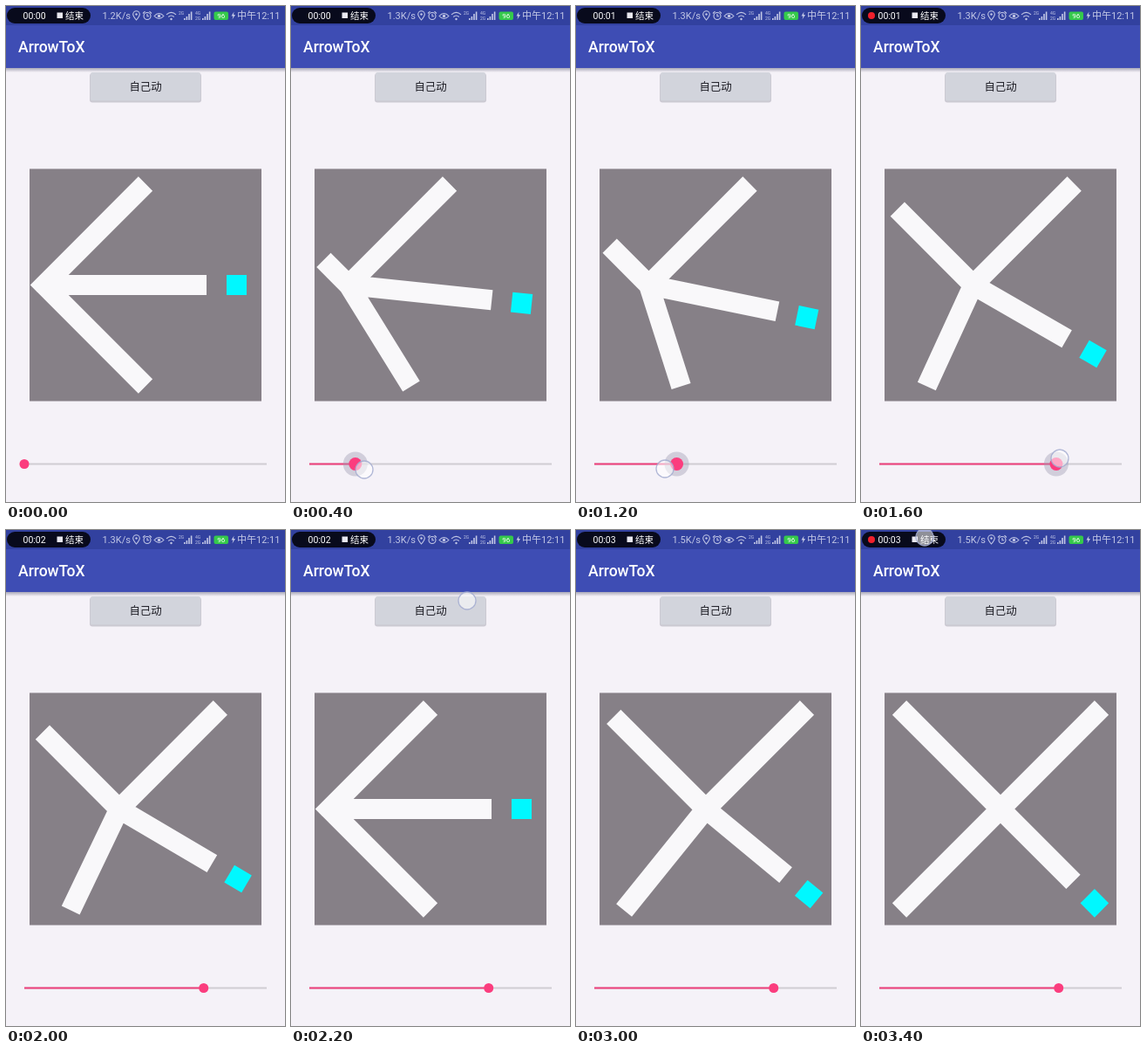
An HTML page that plays this animation: 320 by 568 pixels, repeating every 3600 ms.

```html
<!DOCTYPE html>
<html lang="zh">
<head>
<meta charset="utf-8">
<title>ArrowToX</title>
<style>
  html, body { margin: 0; width: 100%; height: 100%; overflow: hidden; background: #f5f2f8; }
  svg { display: block; width: 320px; height: 568px; }
  text { font-family: Roboto, "Noto Sans CJK SC", "Noto Sans CJK", sans-serif; }
</style>
</head>
<body>
<svg viewBox="0 0 320 568" xmlns="http://www.w3.org/2000/svg">
  <defs>
    <linearGradient id="shade" x2="0" y2="1">
      <stop offset="0" stop-color="#a9a8b8"/>
      <stop offset="1" stop-color="#f5f2f8"/>
    </linearGradient>
  </defs>
  <rect width="320" height="568" fill="#f5f2f8"/>

  <!-- app bar -->
  <rect y="71" width="320" height="5" fill="url(#shade)"/>
  <rect width="320" height="71" fill="#3e4db4"/>
  <rect width="320" height="22" fill="#32419f"/>
  <text x="14" y="53" font-size="17.5" font-weight="500" fill="#fff">ArrowToX</text>

  <!-- recorder pill -->
  <rect x="1" y="2" width="96" height="18" rx="9" fill="#080a1c"/>
  <circle id="rec" cx="12" cy="11" r="4" fill="#f0202c"/>
  <text id="clock" x="19.5" y="15" font-size="10.5" fill="#fff"></text>
  <rect x="58.5" y="7.5" width="6.5" height="6.5" fill="#e8e8f0"/>
  <text x="68" y="15" font-size="10.5" fill="#fff">结束</text>

  <!-- status icons -->
  <g fill="#c3c8e6">
    <text id="speed" x="110.5" y="15" font-size="11"></text>
    <text x="198" y="10" font-size="5">2G</text>
    <text x="217" y="10" font-size="5">4G</text>
    <text x="217" y="16" font-size="5">2G</text>
    <path id="bars" d="M204 16v-2h1.6v2zM206.6 16v-4h1.6v4zM209.2 16v-7h1.6v7zM211.8 16v-9.500h1.6v9.500z"/>
    <use href="#bars" x="21"/>
    <path d="M261.500 6.500l-3 5h2l-1 4 3.500-5.500h-2z"/>
    <text x="265" y="15" font-size="11">中午12:11</text>
    <circle cx="149.500" cy="9.500" r="1.2"/>
    <circle cx="175.500" cy="11.500" r="1.700"/>
    <circle cx="189.500" cy="15" r="1.2"/>
  </g>
  <g fill="none" stroke="#c3c8e6" stroke-width="1.1">
    <path d="M149.500 16Q145.700 11.500 145.700 9.500A3.800 3.800 0 0 1 153.300 9.500Q153.300 11.500 149.500 16Z"/>
    <circle cx="162" cy="11.500" r="4"/>
    <path d="M162 9v2.700h2M157 8.500l2.500-2.300M167 8.500l-2.500-2.300"/>
    <path d="M170 11.500Q175.500 5.500 181 11.500Q175.500 17.500 170 11.500Z"/>
    <path d="M184 9.800Q189.500 4.800 195 9.800M186.300 12.500Q189.500 9.500 192.700 12.500"/>
  </g>
  <rect x="238.500" y="6.500" width="16.500" height="9.500" rx="2" fill="#35c94b"/>
  <text x="246.800" y="14.200" font-size="8" text-anchor="middle" fill="#fff">96</text>

  <!-- button -->
  <rect x="96" y="77" width="128" height="33.500" rx="3" fill="#b9b8c2" opacity=".7"/>
  <rect id="button" x="97" y="76" width="126" height="32.500" rx="2"/>
  <text x="160" y="97.300" font-size="12.400" font-weight="500" text-anchor="middle" fill="#1d1d25">自己动</text>

  <!-- morphing arrow -->
  <rect x="27" y="186.500" width="266" height="266" fill="#868087"/>
  <path id="arms" fill="none" stroke="#f9f8fa" stroke-width="23"/>
  <path id="dot" fill="none" stroke="#00f8ff" stroke-width="23"/>

  <!-- slider -->
  <path d="M21 524.500H299" stroke="#d0cdd3" stroke-width="2"/>
  <path id="fill" stroke="#f0407c" stroke-width="2"/>
  <circle id="halo" cy="524.500" r="14" fill="#9a98b0" opacity=".4"/>
  <circle id="thumb" cy="524.500" fill="#fb3d7e"/>

  <circle id="touch" r="10" fill="#fff" fill-opacity=".55" stroke="#a3abd0" stroke-opacity=".85" stroke-width="1.3"/>
</svg>
<script>
const LOOP = 3600, STEP = 200;
const AUTO = 2200, AUTO_LEN = 1000;   // button-driven run
const MID = 319.5, R = 116;           // drawing centre is (160, MID)

// dragging, one entry per step: slider value, finger x, finger y
const drag = [
  [0], [.03, 33, 524], [.19, 84, 531], [.35, 128, 527], [.51, 174, 525],
  [.55, 170, 527], [.34, 102, 530], [.46, 160, 527], [.73, 228, 518], [.74, 227, 532]
];
const taps = { 2200: [202, 81], 3400: [73, 8] };

const $ = id => document.getElementById(id);
const set = (id, attrs) => {
  for (const k in attrs) $(id).setAttribute(k, attrs[k]);
};
const show = (id, on) => set(id, { visibility: on ? "visible" : "hidden" });
const seg = (a, b) => `M${a[0]} ${a[1]}L${b[0]} ${b[1]}`;

// point at distance d from a towards b
function along(a, b, d) {
  const dx = b[0] - a[0], dy = b[1] - a[1], k = d / Math.hypot(dx, dy);
  return [a[0] + dx * k, a[1] + dy * k];
}

function drawArrow(p) {
  const hub = [160 - R + R * p, MID];
  const top = [160 + R * p, MID - R];
  const low = [160 - R * p, MID + R];
  const tail = [160 + R, MID + R * p];
  const back = 8.1 + (R - 8.1) * p;
  const left = [hub[0] - back, MID - back];
  const len = Math.hypot(tail[0] - hub[0], tail[1] - hub[1]);
  set("arms", {
    d: seg(along(hub, top, -11.5), top) + seg(along(hub, low, -11.5), low) +
       seg(hub, left) + seg(hub, along(hub, tail, len - 46))
  });
  set("dot", { d: seg(along(hub, tail, len - 23), tail) });
}

function draw(time) {
  const t = Math.floor(time % LOOP / STEP) * STEP;
  const [value, fx, fy] = drag[t / STEP] || [.74];
  const held = fx !== undefined;
  const run = Math.min((t - AUTO) / AUTO_LEN, 1);
  drawArrow(t < AUTO ? value : (1 - Math.cos(Math.PI * run)) / 2);

  const x = 21 + 278 * value;
  set("fill", { d: `M21 524.5H${x}` });
  set("thumb", { cx: x, r: held ? 7.5 : 5.5 });
  set("halo", { cx: x });
  show("halo", held);

  const finger = held ? [fx, fy] : taps[t];
  show("touch", finger);
  if (finger) set("touch", { cx: finger[0], cy: finger[1] });

  set("button", { fill: t >= 2400 && t <= 2800 ? "#c7c7ca" : "#d2d4dc" });
  show("rec", t % 900 >= 450);
  $("clock").textContent = "00:0" + Math.floor(t / 1000);
  $("speed").textContent = (t < 400 ? "1.2" : t < 3000 ? "1.3" : "1.5") + "K/s";
}

const start = performance.now();
function tick() {
  draw(performance.now() - start);
  requestAnimationFrame(tick);
}
tick();
</script>
</body>
</html>
```
